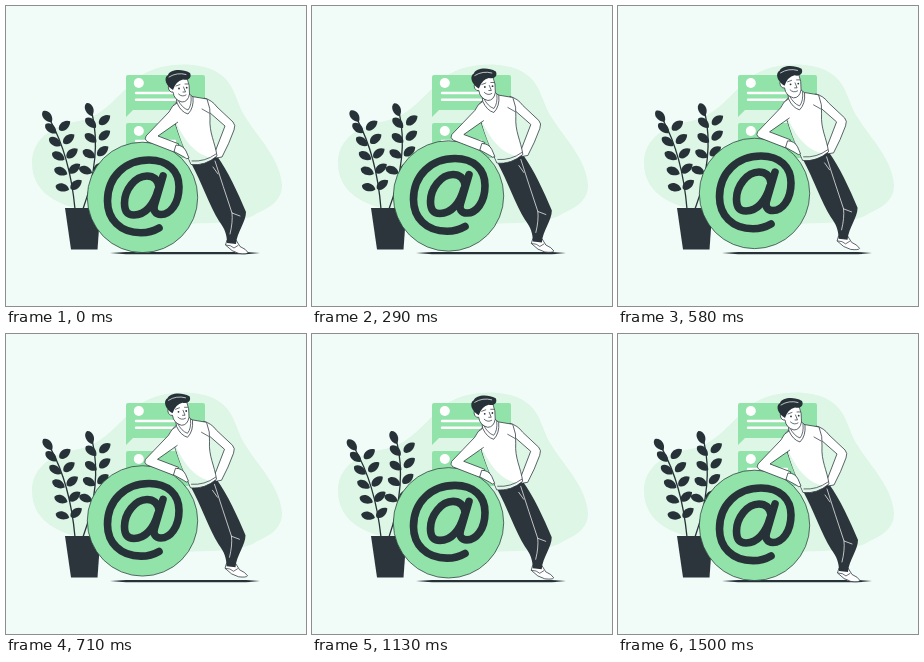
These frames come from a looping animation (300 px wide and 300 px high, 1540 ms). An HTML page:

```html
<!DOCTYPE html>
<html lang="en">
<head>
<meta charset="utf-8">
<title>Leaning on an at sign</title>
<style>
  html, body { margin: 0; width: 100%; height: 100%; overflow: hidden; background: #f1fcf8; }
  svg { display: block; width: 100vw; height: 100vh; }
  .dark { fill: #263238; }
  .cloth { fill: #2c353b; }
  .shade { fill: #ddf6e6; }
  .ink { fill: #fff; stroke: #263238; stroke-width: .75; stroke-linejoin: round; }
  .line, .seam, .stem, .sign { fill: none; stroke: #263238; stroke-width: .7; stroke-linecap: round; }
  .seam { stroke: #fff; }
  .stem { stroke-width: 1.3; }
  .sign { stroke-width: 7.6; stroke-linejoin: round; }
</style>
</head>
<body>
<svg viewBox="0 0 300 300">
  <path class="shade" d="M26 157C26 132 48 119 73 115C99 110 112 88 133 71C153 56 190 55 209 65C230 76 228 94 240 112C252 132 274 152 276 179C276 196 262 202 250 208C232 219 205 216 180 218C140 222 118 210 95 207C62 203 26 192 26 157Z"/>

  <g id="card">
    <path fill="#92e3a9" d="M122 69H197Q199 69 199 71V102Q199 104 197 104H127L120 111V71Q120 69 122 69Z"/>
    <circle cx="132.800" cy="77" r="5" fill="#fff"/>
    <path d="M130 87H169M130 93.700H169" stroke="#fff" stroke-width="2.400" stroke-linecap="round"/>
  </g>
  <use href="#card" y="48"/>

  <path class="dark" d="M104 247L120 246H240L254 247L240 248.300H120Z"/>

  <g id="plant"></g>
  <path class="cloth" d="M59 202H94.500L91.500 243.500H65Z"/>

  <g id="ball">
    <circle cx="136.500" cy="191.400" r="55.200" fill="#92e3a9" stroke="#263238" stroke-width=".7"/>
    <path class="sign" d="M153 222C148 225 142 226.700 135 226.700C114 226.700 101.500 213 101.500 195C101.500 171 119 154 143 154C162 154 173 165 173 181C173 198 164 208.500 155 208.500C149 208.500 147 204 148.500 199L157 170"/>
    <path class="sign" d="M153 181C152 173 147 170 141 170C129 170 118.500 184 118.500 197C118.500 206 122 209 128 209C139 209 148 199 152 184"/>
  </g>

  <g id="man">
    <path class="ink" d="M221 234L219.500 239Q226 246 233 247.500Q241 248.500 242 246.500Q240 243 234 240.500L230 234Z"/>
    <path class="line" d="M220 239Q225 239 228 242L232 239.500"/>
    <path class="cloth" d="M185 157L211 150C222 165 232 187 240 206C240 216 231 226 230 238L221 237C221 229 219 223 213 215C204 201 196 177 185 157Z"/>
    <path class="seam" d="M209 155Q217 180 226 207L234 210M207 161L212 168M226 207Q227 216 224 228"/>

    <path class="ink" d="M198 92Q206 94 211 101L227 116Q230 119 228 124Q223 138 216 151L210 152L209 146L219 120L203 106Z"/>
    <path class="ink" d="M171 96Q179 91 186 90.500L201 93Q205 103 204 112C203 127 209 136 211 150Q199 160 185 158.500C178 142 171 126 166 106Q166 99 171 96Z"/>
    <path class="shade" d="M169 114C178 134 188 148 206 152Q198 158 186 158C178 143 172 128 169 114Z"/>
    <path class="line" d="M203 107L196 103M186 155Q199 156 210 148"/>
    <path class="ink" d="M171 97Q166 99 163 106L140 130Q138 133 141 135.500L168 146L173 138L152 130L172 116"/>
    <path class="ink" d="M168 145.500L170 139Q177 139 180 145L183 152Q181 154 178 151Z"/>

    <path class="ink" d="M170 90L171 97Q175 106 182 108Q188 102 187 91L181 86Z"/>
    <path class="line" d="M172 94Q176 102 182 104Q186 99 185 90"/>
    <path class="ink" d="M165 79Q161 79 163 84Q165 87 167 86Q168 94 176 96Q182 96 183.500 88Q184 79 181 72L169 71Z"/>
    <path class="dark" d="M167 84C160 80 157 72 162 69C164 64 175 62 184 67C186 71 183 75 177 73.500Q170 75 167 84Z"/>
    <path class="seam" d="M163 71Q171 66 180 68.500"/>
    <path class="line" d="M170 80L174 78.500M179 78H182M177.500 81L179.500 86H177M172.500 88Q176 91.500 180 89"/>
    <g class="dark"><circle cx="173" cy="82.500" r=".9"/><circle cx="180.700" cy="81.700" r=".9"/></g>
  </g>
</svg>
<script>
  const LOOP = 1540, STEPS = 37;
  const $ = id => document.getElementById(id);
  const plant = $('plant'), ball = $('ball'), man = $('man');

  function addPath(d, cls, transform = '') {
    const path = document.createElementNS('http://www.w3.org/2000/svg', 'path');
    path.setAttribute('d', d);
    path.setAttribute('class', cls);
    path.setAttribute('transform', transform);
    plant.append(path);
  }

  function addLeaf(x, y, tilt) {
    addPath('M-7 -.5C-5 -5.500 4 -5.500 7 1C3 5.500 -6 5 -7 -.5Z', 'dark',
      `translate(${x} ${y}) rotate(${tilt})`);
  }

  // A curved stem with evenly spaced leaf pairs and one leaf at its tip
  function addBranch(base, bend, tip, firstPair, tipTilt) {
    addPath(`M${base}Q${bend} ${tip}`, 'stem');
    for (let i = firstPair; i < 5; i++) {
      const t = 0.225 + 0.17 * i;
      const [x, y] = base.map((b, k) =>
        b * (1 - t) ** 2 + 2 * bend[k] * t * (1 - t) + tip[k] * t * t);
      const mid = x + 10 * (t - 0.5);
      addLeaf(mid - 6.8, y + 1.5, 40 * t);
      addLeaf(mid + 6.8, y - 1.5, -45);
    }
    addLeaf(tip[0] - 2.5, tip[1] - 3.5, tipTilt);
  }
  addBranch([69, 203], [64, 150], [44, 114], 0, 45);
  addBranch([77, 203], [96, 150], [86, 107], 1, 62);

  function draw(now) {
    const step = Math.floor((now % LOOP) / LOOP * STEPS + 0.1) % STEPS;
    const phase = step / STEPS * 2 * Math.PI;
    const lift = (1 - Math.cos(phase)) / 2;
    ball.setAttribute('transform', `translate(0 ${-4.6 * lift})`);
    man.setAttribute('transform', `translate(${-0.5 * lift} ${-4.8 * lift})`);
    plant.setAttribute('transform', `rotate(${0.85 * Math.sin(phase)} 74 203)`);
  }

  const start = performance.now();
  function tick() {
    draw(performance.now() - start);
    requestAnimationFrame(tick);
  }
  tick();
</script>
</body>
</html>
```
